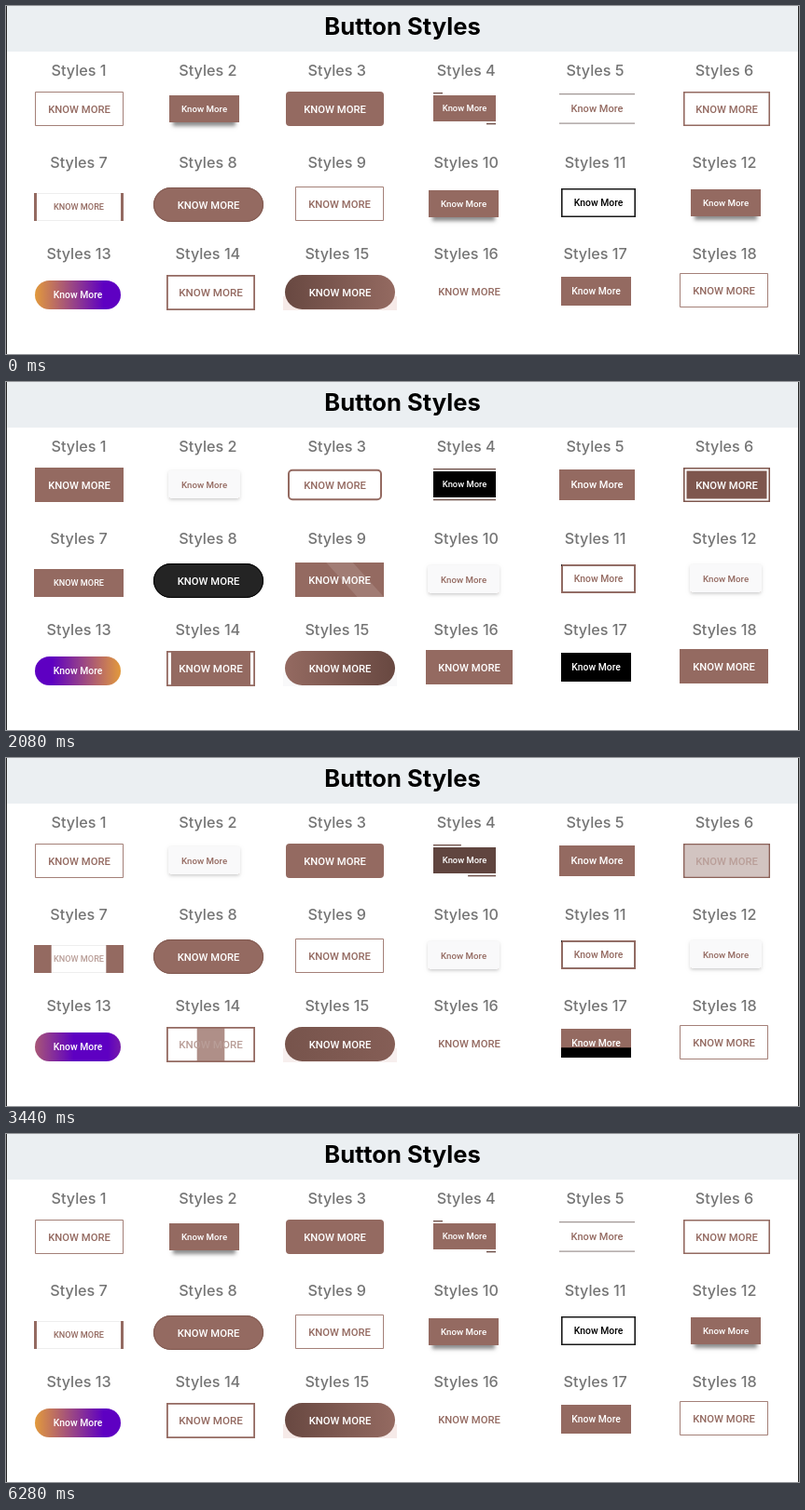
An HTML page with a canvas for the animation above (6.3 s loop, 850 by 374 pixels).

```html
<!DOCTYPE html>
<html lang="en">
<head>
<meta charset="utf-8">
<title>Button Styles</title>
<style>
html, body { margin: 0; width: 100%; height: 100%; overflow: hidden; background: #fff; }
canvas { display: block; }
</style>
</head>
<body>
<canvas id="stage" width="850" height="374"></canvas>
<script>
const ctx = document.getElementById('stage').getContext('2d');
const LOOP = 6300, FADE = 400;
const BROWN = [148, 106, 97], DARK = [126, 86, 77], SHADE = [104, 72, 65];
const WHITE = [255, 255, 255], BLACK = [0, 0, 0], PAPER = [249, 249, 250];
const ORANGE = '#e29a3c', PURPLE = '#5e00c2';

const smooth = x => (x = Math.max(0, Math.min(1, x)), x * x * (3 - 2 * x));
const lerp = (a, b, p) => a + (b - a) * p;
const rgb = (c, alpha = 1) => `rgba(${c.map(Math.round)},${alpha})`;
const mix = (a, b, p) => rgb(a.map((v, i) => lerp(v, b[i], p)));

function text(str, x, y, font, color) {
  ctx.font = font;
  ctx.fillStyle = color;
  ctx.textAlign = 'center';
  ctx.fillText(str, x, y);
}

function fill(x, y, w, h, color, r = 0) {
  ctx.fillStyle = color;
  ctx.beginPath();
  ctx.roundRect(x, y, Math.max(0, w), Math.max(0, h), r);
  ctx.fill();
}

// Border drawn inside the given box
function frame(x, y, w, h, color = rgb(BROWN, .85), line = 1, r = 0) {
  ctx.strokeStyle = color;
  ctx.lineWidth = line;
  ctx.beginPath();
  ctx.roundRect(x + line / 2, y + line / 2, w - line, h - line, r);
  ctx.stroke();
}

function gradient(x, w, ...colors) {
  const g = ctx.createLinearGradient(x, 0, x + w, 0);
  colors.forEach((c, i) => g.addColorStop(i / (colors.length - 1), c));
  return g;
}

// Painters take the box, the hover amount p and whether the pointer has left
function fade(x, y, w, h, p) {
  fill(x, y, w, h, mix(WHITE, BROWN, p));
  frame(x, y, w, h);
}

function raised(x, y, w, h, p) {
  ctx.save();
  ctx.shadowColor = `rgba(0,0,0,${lerp(.45, .25, p)})`;
  ctx.shadowBlur = 4;
  ctx.shadowOffsetY = lerp(4, 1, p);
  const inset = lerp(4, 0, p);
  fill(x + inset, y + inset, w - 2 * inset, h - inset, rgb(BROWN));
  ctx.restore();
  fill(x - p, y - p, w + 2 * p, h + p, mix(BROWN, PAPER, p), 2 * p);
}

function inverted(x, y, w, h, p, leaving) {
  const gap = leaving ? 2 : lerp(26, 2, p);
  fill(x + 2 * p, y + 2 * p, w - 4 * p, h - 4 * p, mix(BROWN, WHITE, p), 4);
  frame(x + gap, y + gap / 3 + 1, w - 2 * gap, h - 2 * gap / 3 - 2, rgb(BROWN, p), 1 + p, 4);
}

function edgeLines(x, y, w, h, p) {
  const len = lerp(10, w, p);
  fill(x, y, w, h, mix(BROWN, BLACK, p));
  fill(x, y - 3, len, 1.3, rgb(SHADE));
  fill(x + w - len, y + h + 2, len, 1.3, rgb(SHADE));
}

function dropDown(x, y, w, h, p, leaving) {
  for (const line of [y, y + h - 1.5]) fill(x, line, w, 1.2, '#a09694');
  fill(x, leaving ? y + h * (1 - p) : y, w, h * p, rgb(BROWN));
}

function inset(x, y, w, h, p) {
  const gap = 1 + 2.5 * p;
  fill(x + gap, y + gap, w - 2 * gap, h - 2 * gap, mix(WHITE, DARK, p));
  frame(x, y, w, h, mix(BROWN, DARK, p), 1.6);
}

function closingSides(x, y, w, h, p) {
  const bar = lerp(3, w / 2, p);
  frame(x, y, w, h, '#eee');
  fill(x, y, bar, h, rgb(BROWN));
  fill(x + w - bar, y, bar, h, rgb(BROWN));
}

function darkPill(x, y, w, h, p) {
  fill(x, y, w, h, mix(BROWN, [36, 36, 36], p), h / 2);
  frame(x, y, w, h, mix(DARK, BLACK, p), 1, h / 2);
}

function glossy(x, y, w, h, p) {
  fade(x, y, w, h, p);
  ctx.fillStyle = rgb(WHITE, .12 * p);
  ctx.beginPath();
  ctx.moveTo(x + w * .35, y);
  ctx.lineTo(x + w * .65, y);
  ctx.lineTo(x + w, y + h);
  ctx.lineTo(x + w * .7, y + h);
  ctx.fill();
}

function recolored(x, y, w, h, p, leaving) {
  const around = 2 * (w + h - 4);
  const drawn = leaving ? Math.max(0, 2 * p - 1) : p;
  frame(x, y, w, h, '#1a1a1a', 1.6);
  ctx.save();
  ctx.setLineDash([around * drawn, around]);
  ctx.lineDashOffset = -around / 2 * (1 - drawn);
  if (drawn) frame(x, y, w, h, rgb(BROWN), 1.8);
  ctx.restore();
}

function rainbow(x, y, w, h, p) {
  fill(x, y, w, h, gradient(x - w * p, 2 * w, ORANGE, '#a04d7f', PURPLE, PURPLE, '#a04d7f', ORANGE), h / 2);
}

function opening(x, y, w, h, p) {
  const span = (w - 10) * p;
  frame(x, y, w, h, rgb(BROWN), 1.8);
  fill(x + (w - span) / 2, y + 1, span, h - 2, rgb(BROWN, Math.min(1, .4 + p)));
}

function shaded(x, y, w, h, p) {
  fill(x - 2, y + h - 14, w + 4, 15, mix([246, 234, 232], PAPER, p));
  fill(x, y, w, h, gradient(x, w, mix(SHADE, BROWN, p), mix(BROWN, SHADE, p)), h / 2);
}

function appear(x, y, w, h, p, leaving) {
  fill(x, y, w, leaving ? h * p : h, rgb(BROWN, leaving ? 1 : p));
  frame(x, y, w, h, rgb(BROWN, p));
}

function riseUp(x, y, w, h, p) {
  fill(x, y, w, h, rgb(BROWN));
  fill(x, y + h * (1 - p), w, h * p, '#000');
}

function grow(x, y, w, h, p) {
  const dx = w * .22 * (1 - p), dy = h * .22 * (1 - p), out = 4 * p;
  fill(x + dx, y + dy, w - 2 * dx, h - 2 * dy, rgb(BROWN, p));
  frame(x - out, y - out / 2, w + 2 * out, h + out, rgb(BROWN, .85 * (1 - p) ** 2));
}

// Times at which the pointer enters and leaves
const quick = { enter: 1040, leave: 2680 };
const soft = { enter: 1170, leave: 2910 };
const brisk = { enter: 1060, leave: 3200 };
const held = { enter: 1160, leave: 3200 };
const lift = { enter: 1260, leave: 3820 };
const late = { enter: 1680, leave: 3980 };

const small = { w: 75, h: 29, label: 'Know More' };
const card = { ...small, ...lift, paint: raised, from: WHITE, to: BROWN };

const buttons = [
  { x: 31, ...quick, paint: fade },
  { x: 175, ...card },
  { x: 300, w: 105, ...soft, paint: inverted, from: WHITE, to: BROWN },
  { x: 458, ...small, w: 67, h: 28, ...brisk, paint: edgeLines, from: WHITE },
  { x: 593, ...small, w: 81, h: 33, ...late, paint: dropDown },
  { x: 726, w: 93, ...held, paint: inset },
  { x: 30, w: 96, h: 30, ...held, paint: closingSides },
  { x: 158, w: 118, ...quick, paint: darkPill, from: WHITE },
  { x: 310, ...quick, paint: glossy },
  { x: 453, ...card },
  { x: 595, ...small, w: 80, h: 31, ...lift, paint: recolored, from: BLACK, to: BROWN },
  { x: 734, ...card },
  { x: 31, ...small, w: 92, h: 31, ...brisk, paint: rainbow, from: WHITE },
  { x: 172, h: 38, ...held, paint: opening },
  { x: 299, w: 118, ...held, enter: late.enter, paint: shaded, from: WHITE },
  { x: 450, w: 93, ...soft, paint: appear },
  { x: 595, ...small, h: 31, ...brisk, paint: riseUp, from: WHITE },
  { x: 722, ...soft, paint: grow }
];

function drawButton({ x, w = 95, h = 37, label = 'KNOW MORE', enter, leave, paint, from = BROWN, to = WHITE }, i, t) {
  const col = i % 6, row = Math.floor(i / 6);
  text('Styles ' + (i + 1), 78 + 138.4 * col, 75 + 98.5 * row, '500 16.2px Inter, sans-serif', '#757575');

  // The lower rows sag a little towards the left
  const middle = [110.3, 211.3, 305.6][row] + (row && 4.7 * Math.exp(-.6 * col));
  const y = Math.round(middle - h / 2);
  const leaving = t >= leave;
  const p = leaving ? 1 - smooth((t - leave) / FADE) : smooth((t - enter) / FADE);
  paint(x, y, w, h, p, leaving);

  const size = h * (label === small.label ? .335 : .305);
  text(label, x + w / 2, y + h / 2 + size * .36, `500 ${size}px Roboto, sans-serif`, mix(from, to, p));
}

function draw(t) {
  fill(0, 0, 850, 374, '#fff');
  fill(0, 0, 850, 49, '#ebeff2');
  for (const x of [0, 849]) fill(x, 0, 1, 374, '#222');
  text('Button Styles', 425, 31, '700 25.6px Inter, sans-serif', '#000');
  buttons.forEach((button, i) => drawButton(button, i, t));
}

function tick() {
  draw(performance.now() % LOOP);
  requestAnimationFrame(tick);
}
tick();
</script>
</body>
</html>
```
